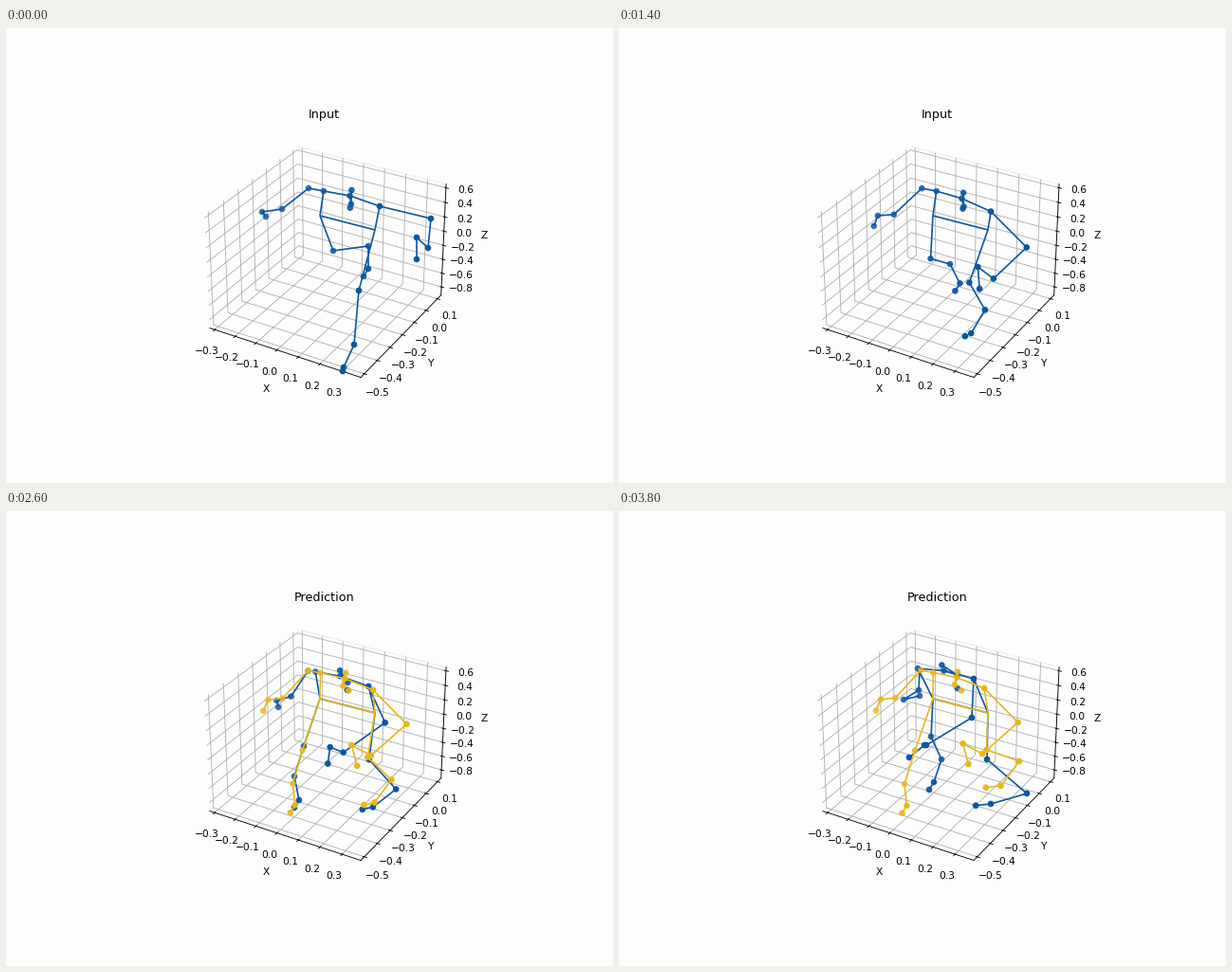
These frames come from a looping animation (640x480 px, 4 s). A matplotlib script:

```python
import numpy as np
import matplotlib.pyplot as plt
from matplotlib.animation import FuncAnimation
from matplotlib.collections import LineCollection
from matplotlib.colors import to_rgba

W, H, DPI = 640, 480, 80
FRAMES, STEP = 20, 200
SWITCH = 2000  # ms at which the prediction starts
BLUE, GOLD, PAPER = "#0b57a4", "#e8b71a", "#fdfdfd"
HIPS = np.array([(331, 198), (389, 213)])

plt.rcParams.update({"font.family": "DejaVu Sans", "font.size": 9.6})

# Joint order: leg (knee, ankle, foot, toe) x2, trunk (spine, neck, nose, head),
# arm (shoulder, elbow, wrist, thumb, hand) x2, hips
CHAINS = [
    (22, *range(4)), (23, *range(4, 8)), (22, 23),
    (22, *range(12, 17)), (23, *range(17, 22)), (12, 9, 17), (9, 10, 11),
]
# Distant joints are paler
SHADE = np.repeat([0.8, 0.9, 1, 0.85, 0.75, 1], [2, 2, 4, 4, 5, 5])


def smooth(s):
    s = np.clip(s, 0, 1)
    return s * s * (3 - 2 * s)


class Limb:
    """Joints on Hermite paths through a few points, at rest at both ends."""

    def __init__(self, times, *paths):
        self.t = np.array(times, float)
        self.p = np.array(paths, float).swapaxes(0, 1)
        self.m = np.gradient(self.p, self.t, axis=0)
        self.m[[0, -1]] = 0

    def at(self, ms):
        ms = min(ms, self.t[-1])
        i = min(np.searchsorted(self.t, ms, "right"), len(self.t) - 1) - 1
        h = self.t[i + 1] - self.t[i]
        s = (ms - self.t[i]) / h
        bend = h * s * (1 - s) * ((1 - s) * self.m[i] - s * self.m[i + 1])
        return self.p[i] + (self.p[i + 1] - self.p[i]) * smooth(s) + bend


class Forecast:
    """A limb frozen near the switch that then eases off by a shift."""

    def __init__(self, limb, shift, span, weights=(1,), lag=0):
        self.base = limb.at(SWITCH - lag)
        self.shift = np.outer(weights, shift)
        self.span = span

    def at(self, ms):
        return self.base + self.shift * smooth((ms - SWITCH) / self.span)


l_leg = Limb(
    [0, 600, 2000, 2600, 3800],
    [(345, 235), (337, 236), (322, 248), (314, 248), (329, 238)],
    [(382, 230), (374, 217), (326, 276), (304, 280), (340, 262)],
    [(382, 254), (394, 235), (326, 300), (309, 305), (332, 286)],
)
r_leg = Limb(
    [0, 600, 2000, 3800],
    [(372, 277), (363, 275), (378, 264), (388, 262)],
    [(367, 334), (372, 311), (398, 294), (430, 298)],
    [(356, 358), (359, 336), (381, 317), (392, 309)],
)
l_arm = Limb(
    [0, 2200, 3600],
    [(335, 172), (331, 171), (315, 166)],
    [(319, 169), (319, 169), (317, 168)],
    [(291, 191), (294, 198), (316, 189)],
    [(270, 194), (279, 200), (300, 199)],
    [(274, 199), (275, 211), (317, 195)],
)
r_arm = Limb(
    [0, 600, 2000, 3500],
    [(394, 188), (394, 193), (389, 191), (374, 177)],
    [(448, 201), (437, 226), (422, 227), (372, 218)],
    [(445, 232), (414, 258), (383, 260), (324, 247)],
    [(433, 221), (405, 245), (362, 250), (322, 247)],
    [(433, 244), (400, 269), (368, 271), (306, 260)],
)
leg_weights = (0.4, 1, 0.9)


class Body:
    def __init__(self, ax, limbs, color, nod, z):
        self.limbs, self.nod = limbs, nod
        self.bones = LineCollection([], colors=color, linewidths=1.5, zorder=z)
        ax.add_collection(self.bones, autolim=False)
        self.dots = ax.scatter(np.zeros(22), np.zeros(22), s=20, linewidths=1.5,
                               c=[to_rgba(color, a) for a in SHADE], zorder=z + 1)

    def joints(self, ms):
        ll, rl, la, ra = (limb.at(ms) for limb in self.limbs)
        t = ms / 1000
        l_toe = ll[2] + (-5, 8)
        r_toe = rl[2] + (-1 - 3.9 * t, 4 - 0.6 * t)
        # The head follows the shoulders and turns as they lean
        neck = (la[0] + ra[0]) / 2 + (-2, -3)
        lean = 363 - neck[0]
        spine = (363, 190) + 0.3 * (neck - (363, 178))
        nose = neck + (1 + self.nod * lean, 9 - 0.22 * lean)
        head = neck + (2 - 0.2 * lean, -6)
        return np.vstack([ll, l_toe, rl, r_toe, spine, neck, nose, head, la, ra, HIPS])

    def show(self, ms, visible=True):
        self.bones.set_visible(visible)
        self.dots.set_visible(visible)
        if visible:
            joints = self.joints(ms)
            self.bones.set_segments([joints[list(c)] for c in CHAINS])
            self.dots.set_offsets(joints[:22])


fig = plt.figure(figsize=(W / DPI, H / DPI), dpi=DPI, facecolor=PAPER)

# Square 3D axes, placed by centre and side in pixels
cx, cy, side = 335.2, 244.7, 283.5
ax = fig.add_axes([(cx - side / 2) / W, 1 - (cy + side / 2) / H, side / W, side / H],
                  projection="3d")
ax.set_facecolor("none")
ax.view_init(elev=30, azim=-60)
ax.set_xlabel("X")
ax.set_ylabel("Y")
ax.set_zlabel("Z", labelpad=3)
ax.set_xticks(np.arange(-3, 4) / 10)
ax.set_yticks(np.arange(-5, 2) / 10)
ax.set_zticks(np.arange(-4, 4) / 5)
ax.set_xlim(-0.324, 0.384)
ax.set_ylim(-0.526, 0.132)
ax.set_zlim(-0.92, 0.65)
for axis in (ax.xaxis, ax.yaxis, ax.zaxis):
    axis.set_pane_color(to_rgba(PAPER))
ax.yaxis.pane.set_edgecolor("#eeeeee")
title = ax.set_title("Input", pad=7.2)

stage = fig.add_axes([0, 0, 1, 1], zorder=5)
stage.axis("off")
truth = Body(stage, [l_leg, r_leg, l_arm, r_arm], BLUE, 0.65, 2)
guess = Body(stage, [
    Forecast(l_leg, (-25, 12), 700, leg_weights),
    Forecast(r_leg, (24, -30), 1500, leg_weights),
    Forecast(l_arm, (-1, -1), 1000),
    Forecast(r_arm, (-5, -5), 1000, lag=200),
], GOLD, -0.5, 4)
stage.set(xlim=(0, W), ylim=(H, 0))


def draw(i):
    ms = i * STEP
    late = ms >= SWITCH
    title.set_text("Prediction" if late else "Input")
    truth.show(ms)
    guess.show(ms, late)
    return title, truth.bones, truth.dots, guess.bones, guess.dots


anim = FuncAnimation(fig, draw, frames=FRAMES, interval=STEP, repeat=True,
                     repeat_delay=0, blit=False)
plt.show()
```
